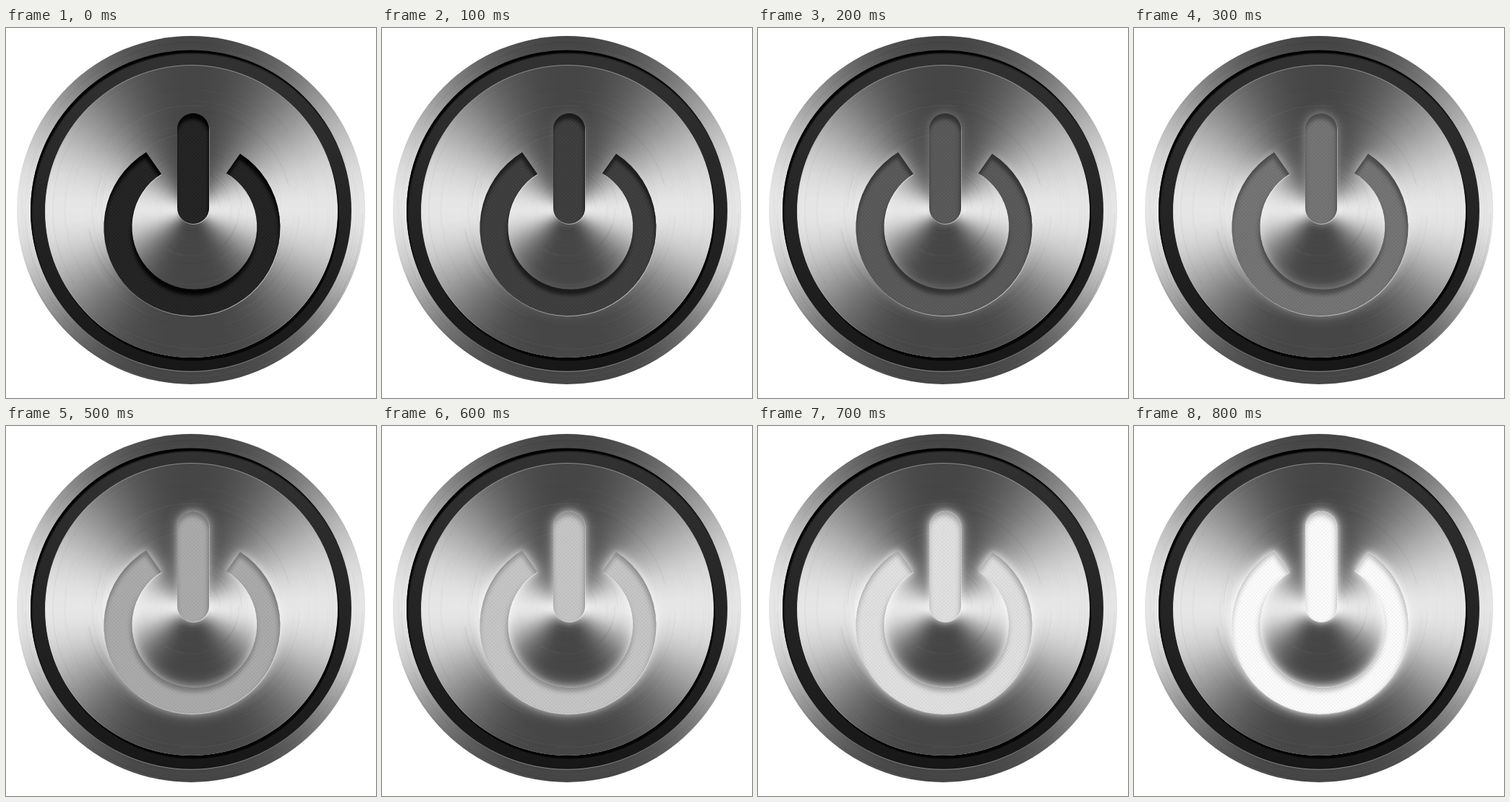
Animation of 512x512 px, one loop 900 ms. Source, as an HTML page with a canvas:

```html
<!DOCTYPE html>
<html lang="en">
<head>
<meta charset="utf-8">
<title>Power button</title>
<style>
  html, body { margin: 0; width: 100%; height: 100%; overflow: hidden; background: #fff; }
  canvas { position: absolute; left: 0; top: 0; width: 512px; height: 512px; }
  #lit { animation: glow 900ms steps(9, jump-none) infinite; }
  @keyframes glow { from { opacity: 0; } to { opacity: 1; } }
</style>
</head>
<body>
<canvas id="button" width="512" height="512"></canvas>
<canvas id="lit" width="512" height="512"></canvas>
<script>
const base = document.getElementById('button').getContext('2d');
const lit = document.getElementById('lit').getContext('2d');
const TAU = Math.PI * 2;

const symbol = new Path2D(
  'M237 140 A22 22 0 0 1 281 140 V249 A22 22 0 0 1 237 249 Z' +
  'M194 172 A122 122 0 1 0 324 174 L305 201 A86.5 86.5 0 1 1 215 202 Z');

let seed = 7;
function random() {
  seed = (seed * 1664525 + 1013904223) % 4294967296;
  return seed / 4294967296;
}

function circle(x, y, r) {
  const path = new Path2D();
  path.arc(x, y, r, 0, TAU);
  return path;
}

function fill(ctx, path, style, dx = 0, dy = 0) {
  ctx.save();
  ctx.translate(dx, dy);
  ctx.fillStyle = style;
  ctx.fill(path);
  ctx.restore();
}

function vertical(ctx, top, bottom, from, to) {
  const gradient = ctx.createLinearGradient(0, top, 0, bottom);
  gradient.addColorStop(0, from);
  gradient.addColorStop(1, to);
  return gradient;
}

function insetShadow(ctx, path, color, dx, dy, blur) {
  const outside = new Path2D();
  outside.rect(-100, -100, 712, 712);
  outside.addPath(path);
  ctx.save();
  ctx.clip(path);
  // The caster lies far above the stage, so only its shadow is painted.
  ctx.translate(0, -2000);
  ctx.shadowColor = color;
  ctx.shadowOffsetX = dx;
  ctx.shadowOffsetY = dy + 2000;
  ctx.shadowBlur = blur;
  ctx.fill(outside, 'evenodd');
  ctx.restore();
}

// Dark at top and bottom, bright at the sides; the lower half falls off faster.
function sheen(angle) {
  const falloff = Math.cos(angle) > 0 ? 2.4 : 3.6;
  return Math.round(70 + 160 * Math.abs(Math.sin(angle)) ** falloff);
}

function brushedMetal(path, from, to, streaks) {
  const cx = 257, cy = 252, steps = 72;
  const gradient = base.createConicGradient(-Math.PI / 2, cx, cy);
  for (let i = 0; i <= steps; i++) {
    const level = sheen(i / steps * TAU);
    gradient.addColorStop(i / steps, `rgb(${level},${level},${level})`);
  }
  fill(base, path, gradient);
  base.save();
  base.clip(path);
  for (let i = 0; i < streaks; i++) {
    const start = random() * TAU;
    const tone = random() < 0.5 ? 0 : 255;
    base.lineWidth = 0.5 + random();
    base.strokeStyle = `rgba(${tone},${tone},${tone},${0.01 + random() * 0.04})`;
    base.beginPath();
    base.arc(cx, cy, from + random() * (to - from), start, start + 0.3 + random());
    base.stroke();
  }
  base.restore();
}

function weave(ctx, color) {
  const size = 5;
  const tile = document.createElement('canvas');
  tile.width = tile.height = size;
  const t = tile.getContext('2d');
  t.fillStyle = color;
  for (let i = 0; i < size; i++) {
    t.fillRect(i, i, 1, 1);
    t.fillRect(size - 1 - i, i, 1, 1);
  }
  return ctx.createPattern(tile, 'repeat');
}

function drawButton() {
  const groove = circle(256, 252.7, 222);
  const face = circle(256.5, 253.5, 202.5);

  brushedMetal(circle(256, 252, 241), 220, 241, 60);
  fill(base, groove, vertical(base, 400, 475, 'rgba(150,150,150,0)', '#888'), 0, 1);
  fill(base, groove, vertical(base, 30, 475, '#323232', '#171717'));
  insetShadow(base, groove, '#000', 2, 4, 2);

  fill(base, face, '#050505', 2, 4.5);
  fill(base, face, vertical(base, 50, 250, '#888', '#ddd'));
  brushedMetal(circle(256.5, 254, 202), 4, 203, 320);

  fill(base, symbol, 'rgba(255,255,255,.5)', 0.6, 1);
  fill(base, symbol, '#262626');
  fill(base, symbol, weave(base, 'rgba(0,0,0,.15)'));
  insetShadow(base, symbol, '#050505', -1, 8, 4);
}

function drawLight() {
  lit.save();
  lit.shadowColor = 'rgba(255,255,255,.75)';
  for (const blur of [20, 8]) {
    lit.shadowBlur = blur;
    fill(lit, symbol, '#fff');
  }
  lit.restore();
  fill(lit, symbol, '#fcfcfc');
  fill(lit, symbol, weave(lit, 'rgba(0,0,0,.04)'));
  insetShadow(lit, symbol, 'rgba(100,100,100,.45)', -1, 5, 7);
}

drawButton();
drawLight();
</script>
</body>
</html>
```
